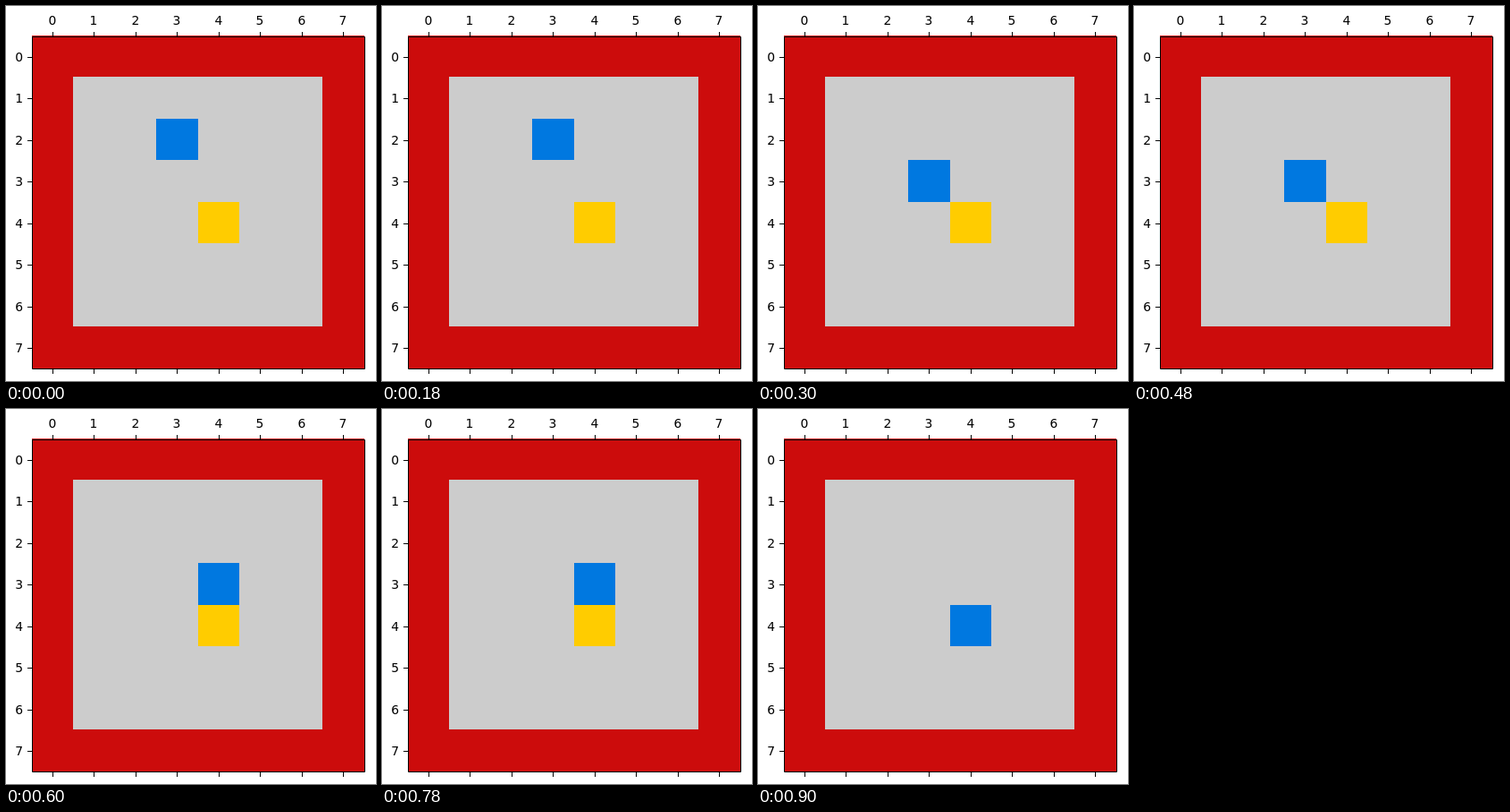
Write an HTML page that moves like this. It is 414 px wide and 419 px high and loops after 1200 ms.

```html
<!DOCTYPE html>
<html lang="en">
<head>
<meta charset="utf-8">
<title>Grid walk</title>
<style>
  html, body { margin: 0; width: 100%; height: 100%; overflow: hidden; background: #fff; }
  svg { display: block; }
  text { font: 13.89px "DejaVu Sans", sans-serif; }
</style>
</head>
<body>
<svg id="stage" width="414" height="419" viewBox="0 0 414 419"></svg>
<script>
const SIZE = 8, STEP_MS = 300;
const RED = '#cc0c0c', GREY = '#cccccc', BLUE = '#0078e0', YELLOW = '#ffcc00';
const PATH = [[3, 2], [3, 3], [4, 3], [4, 4]];
const GOAL = [4, 4];
const stage = document.getElementById('stage');

const edgeX = i => Math.floor(29 + 46.5 * i);
const edgeY = i => Math.floor(33 + 46.5 * i);

function add(tag, attrs, content = '') {
  const node = document.createElementNS('http://www.w3.org/2000/svg', tag);
  set(node, attrs);
  node.textContent = content;
  return stage.appendChild(node);
}

function set(node, attrs) {
  for (const key in attrs) node.setAttribute(key, attrs[key]);
}

function cells(x, y, span = 1) {
  const left = edgeX(x), top = edgeY(y);
  return { x: left, y: top, width: edgeX(x + span) - left, height: edgeY(y + span) - top };
}

function line(d) {
  add('path', { d, fill: 'none', stroke: '#000' });
}

add('rect', { ...cells(0, 0, SIZE), fill: RED });
add('rect', { ...cells(1, 1, SIZE - 2), fill: GREY });
add('rect', { ...cells(...GOAL), fill: YELLOW });
const walker = add('rect', { fill: BLUE });

// Axes: border, ticks on three sides, labels on two
line('M29.5 34.5H401.5V405.5H29.5Z');
for (let i = 0; i < SIZE; i++) {
  const x = Math.round(52 + 46.45 * i), y = Math.round(56.9 + 46.45 * i);
  line(`M${x + 0.5} 29V34M${x + 0.5} 406V411M24 ${y + 0.5}H29`);
  add('text', { x, y: 21, 'text-anchor': 'middle' }, i);
  add('text', { x: 19, y: y + 5, 'text-anchor': 'end' }, i);
}

function draw(time) {
  const step = Math.floor(time / STEP_MS) % PATH.length;
  set(walker, cells(...PATH[step]));
}

function tick() {
  draw(performance.now() - start);
  requestAnimationFrame(tick);
}

const start = performance.now();
tick();
</script>
</body>
</html>
```
